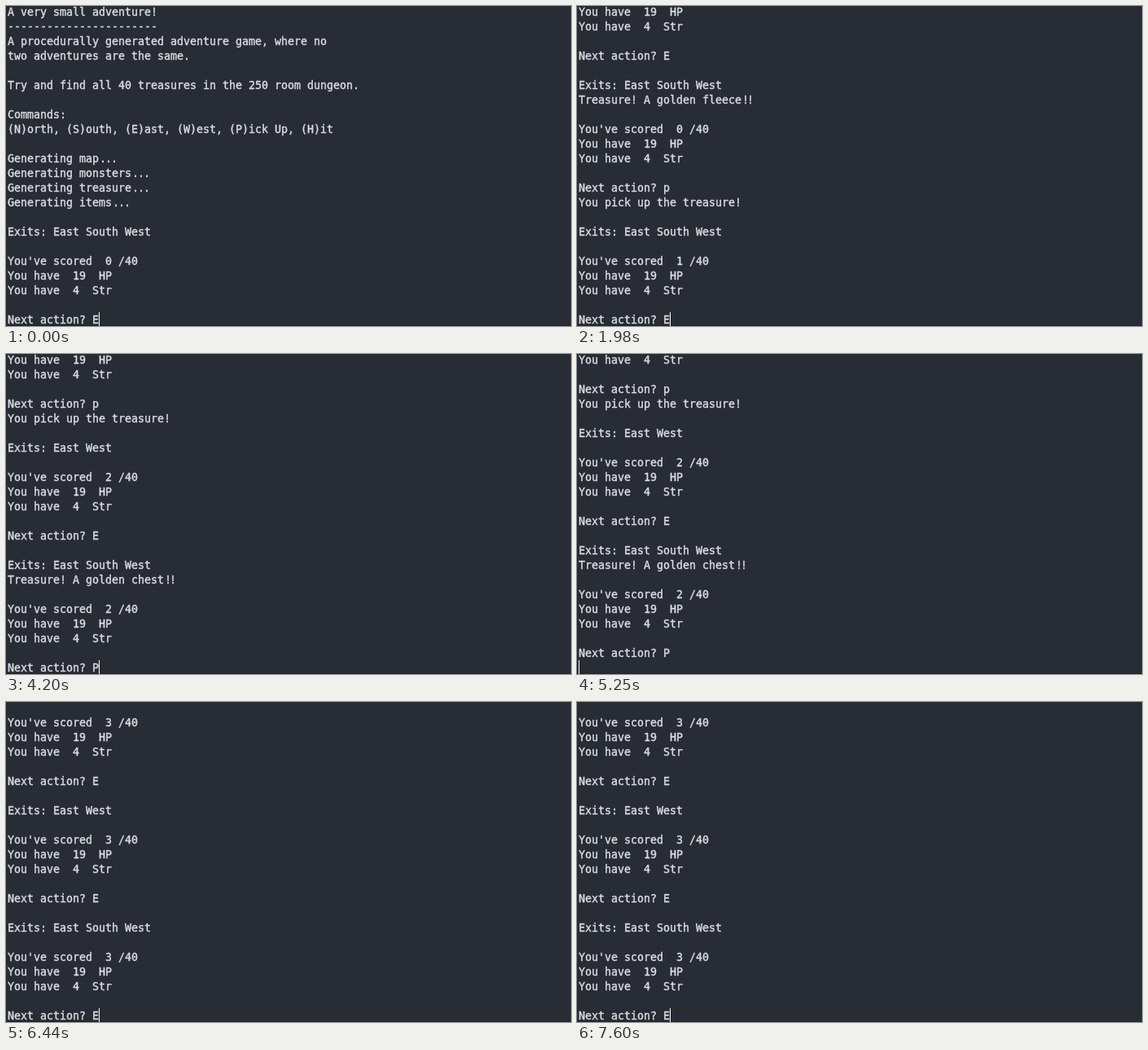
Write an HTML page with a canvas that moves like this. It is 694 px wide and 393 px high and loops after 8000 ms.

```html
<!DOCTYPE html>
<html lang="en">
<head>
<meta charset="utf-8">
<title>A very small adventure!</title>
<style>
  html, body { margin: 0; width: 100%; height: 100%; overflow: hidden; background: #282c34; }
  canvas { display: block; }
</style>
</head>
<body>
<canvas id="term" width="694" height="393"></canvas>
<script>
const LOOP = 8000, ROWS = 22, CELL = 8, LINE = 18, LEFT = 2;
const ctx = document.getElementById('term').getContext('2d');

const status = score =>
  `\nYou've scored  ${score} /40\nYou have  19  HP\nYou have  4  Str\n\nNext action? `;
const room = (exits, loot) =>
  `\nExits: ${exits}\n` + (loot ? `Treasure! A golden ${loot}!!\n` : '');

const ESW = 'East South West', EW = 'East West';
const PICKED = 'You pick up the treasure!\n';

const intro = `A very small adventure!
${'-'.repeat(23)}
A procedurally generated adventure game, where no
two adventures are the same.

Try and find all 40 treasures in the 250 room dungeon.

Commands:
(N)orth, (S)outh, (E)ast, (W)est, (P)ick Up, (H)it

Generating map...
Generating monsters...
Generating treasure...
Generating items...
` + room(ESW) + status(0) + 'E';

// Each entry is [time, text written to the terminal].
const log = [[0, intro]];

function turn(times, score, key, exits, { loot = '', picked = '' } = {}) {
  const found = room(exits, loot), rest = status(score);
  const writes = {
    2: ['\n' + picked, found + rest + key],
    3: ['\n', picked + found + rest, key],
    4: ['\n', picked + found, rest, key]
  }[times.length];
  times.forEach((t, i) => log.push([t, writes[i]]));
}

turn([1000, 1030, 1080, 1130], 0, 'p', ESW, { loot: 'fleece' });
turn([1930, 1950, 1980], 1, 'E', ESW, { picked: PICKED });
turn([2600, 2630], 1, 'p', EW, { loot: 'chest' });
turn([3620, 3650], 2, 'E', EW, { picked: PICKED });
turn([4170, 4200], 2, 'P', ESW, { loot: 'chest' });
turn([5250, 5270, 5300], 3, 'E', ESW, { picked: PICKED });
turn([5620, 5640], 3, 'E', EW);
turn([6390, 6410, 6440], 3, 'E', ESW);
turn([6790, 6820, 6850], 3, 'E', ESW);
turn([7200, 7230], 3, 'E', EW);
turn([7550, 7570, 7600], 3, 'E', ESW);

function drawLine(text, row) {
  const y = row * LINE + 12;
  const nudge = {};
  // Repeated dots and exclamation marks sit slightly closer together.
  for (const m of text.matchAll(/\.{3}|!!/g)) {
    const n = m[0].length, mid = (n - 1) / 2;
    for (let i = 0; i < n; i++) nudge[m.index + i] = (mid - i) * 2 / (n - 1);
  }
  for (let i = 0; i < text.length; i++) {
    if (text[i] === ' ') continue;
    const x = LEFT + i * CELL + (nudge[i] || 0);
    ctx.fillText(text[i], x, y);
    ctx.strokeText(text[i], x, y);
  }
}

function draw(t) {
  const text = log.filter(([at]) => at <= t).map(([, s]) => s).join('');
  const lines = text.split('\n').slice(-ROWS);
  ctx.fillStyle = '#282c34';
  ctx.fillRect(0, 0, 694, 393);
  ctx.fillStyle = '#1f2228';
  ctx.fillRect(0, 392, 694, 1);
  // A thin outline gives the regular face a medium weight.
  ctx.font = '13.333px "DejaVu Sans Mono", "Noto Sans Mono", monospace';
  ctx.fillStyle = ctx.strokeStyle = '#d9dce2';
  ctx.lineWidth = 0.4;
  ctx.lineJoin = 'round';
  lines.forEach(drawLine);
  ctx.fillStyle = '#ffffff';
  ctx.fillRect(LEFT + lines[ROWS - 1].length * CELL, 376, 1, 17);
}

const start = performance.now();
function tick() {
  draw((performance.now() - start) % LOOP);
  requestAnimationFrame(tick);
}
tick();
</script>
</body>
</html>
```
